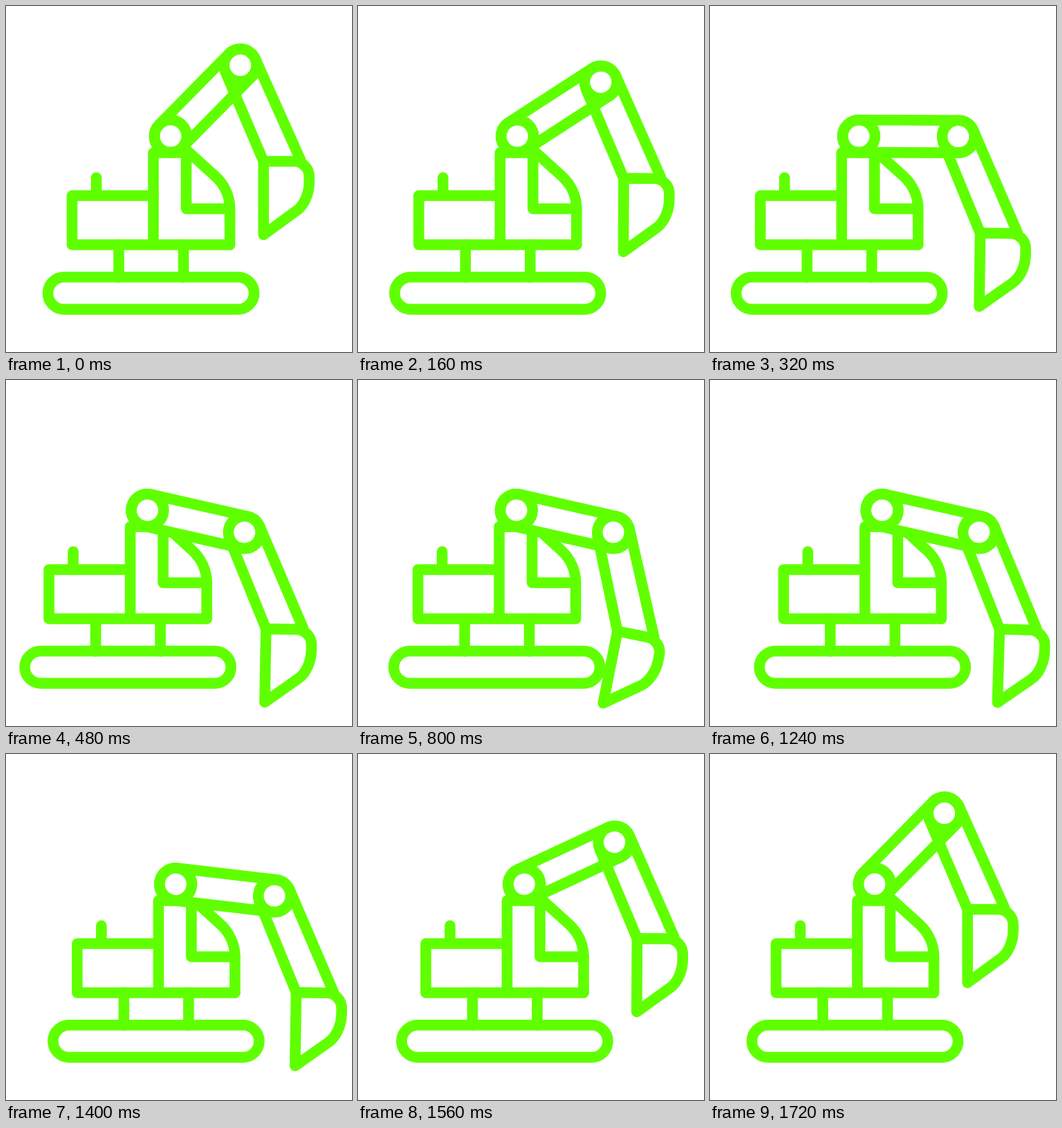
Animation, 500 px wide and 500 px high, one loop 2000 ms. Source, as an HTML page:

```html
<!DOCTYPE html>
<html lang="en">
<head>
<meta charset="utf-8">
<title>Excavator</title>
<style>
  html, body { margin: 0; height: 100%; overflow: hidden; background: #fff; }
  svg { display: block; width: 100%; height: 100%; }
</style>
</head>
<body>
<svg viewBox="0 0 500 500" fill="none" stroke="#60ff00" stroke-width="15.6"
     stroke-linecap="round" stroke-linejoin="round">
  <g id="machine">
    <rect x="61" y="391.8" width="298" height="46.6" rx="23.3"/>
    <path d="M163.5 345V392M257 345V392"/>
    <path d="M131 248V274M213.5 274H96V345H324"/>
    <path d="M213.5 345V212H261V293H324"/>
    <path d="M261 208L303 246C316 258 324 275 324 293V345"/>
    <g id="boom">
      <rect x="-23.4" y="-23.4" width="190.7" height="46.8" rx="23.4" fill="#fff"/>
      <circle r="23.4"/>
      <circle cx="143.9" r="23.4"/>
      <g id="stick">
        <path d="M-21.5 10L33.5 139M21.5 -9.5L87 137"/>
        <path d="M33.5 139h44a22 22 0 0 1 22 22v8c0 16 -7 33 -18 41L33.5 245z"/>
      </g>
    </g>
  </g>
</svg>
<script>
const LOOP = 2000, STEP = 40;
const BOOM_UP = -45.5, BOOM_TRAVEL = 58.3, SCOOP = 10.25;

const [machine, boom, stick] =
  ['machine', 'boom', 'stick'].map(id => document.getElementById(id));

// Eased rise from 0 to 1, beginning at start and lasting duration.
function ramp(time, start, duration) {
  const p = Math.min(1, Math.max(0, (time - start) / duration));
  return p * p * (3 - 2 * p);
}

function draw(time) {
  const lowered = ramp(time, 40, 400) - ramp(time, 1320, 400);
  const scooped = ramp(time, 480, 320) - ramp(time, 800, 520);
  const drive = -34 * ramp(time, 0, 520) + 45 * ramp(time, 520, 520) - 11 * ramp(time, 1200, 520);

  const boomAngle = BOOM_UP + BOOM_TRAVEL * lowered;
  const stickAngle = lowered + SCOOP * scooped;

  machine.setAttribute('transform', `translate(${drive - 0.5} 0)`);
  boom.setAttribute('transform', `translate(238.3 188.2) rotate(${boomAngle})`);
  // The stick keeps its own angle, independent of the boom.
  stick.setAttribute('transform', `translate(143.9 0) rotate(${stickAngle - boomAngle})`);
}

const start = performance.now();

function tick() {
  const elapsed = (performance.now() - start) % LOOP;
  draw(Math.floor(elapsed / STEP) * STEP);
  requestAnimationFrame(tick);
}
tick();
</script>
</body>
</html>
```
